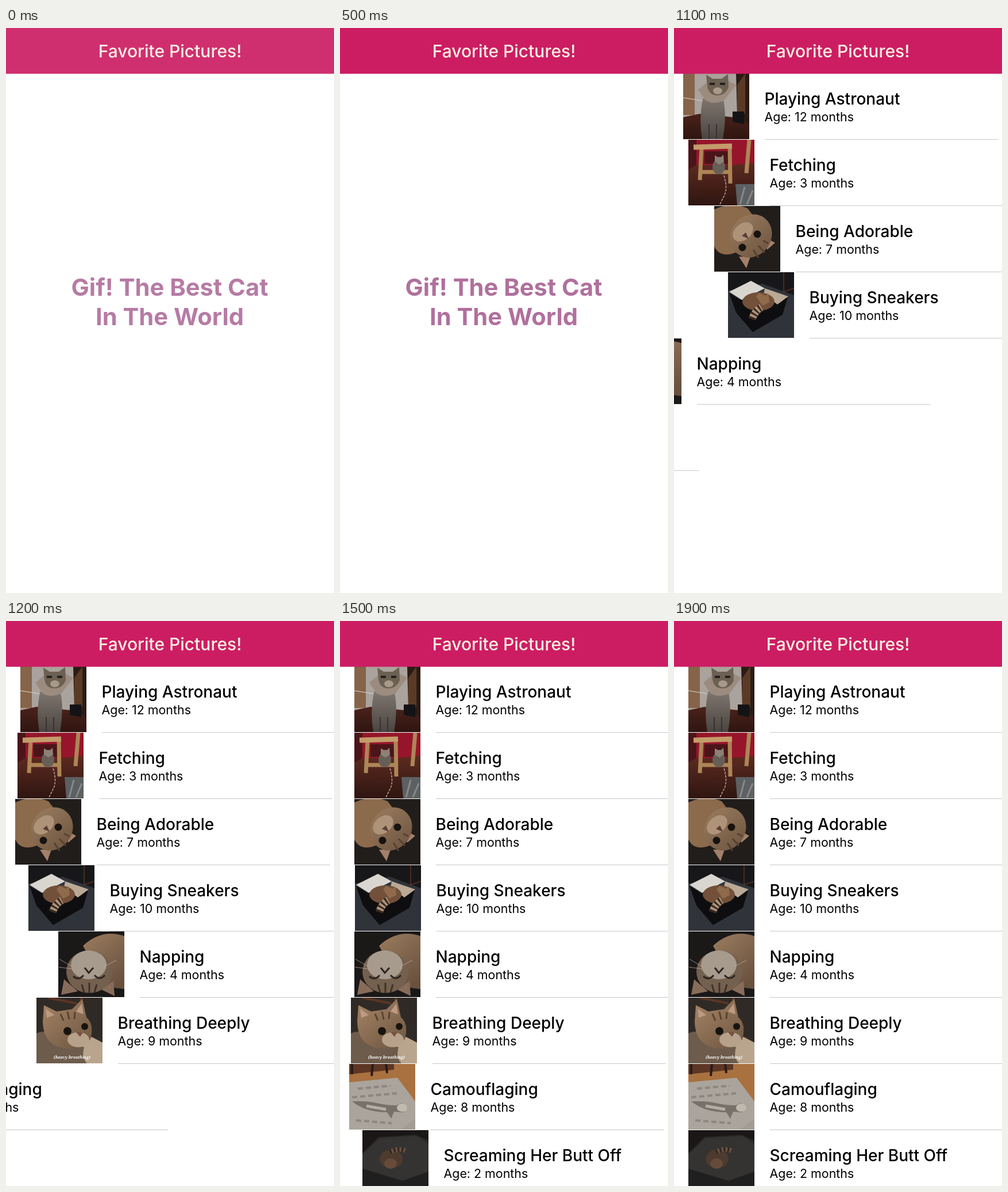
Recreate the animation shown at these times as an HTML page with a canvas. Size 571 by 981 pixels, loop 2 s.

```html
<!DOCTYPE html>
<html lang="en">
<head>
<meta charset="utf-8">
<title>Favorite Pictures!</title>
<style>
  html, body { margin: 0; width: 100%; height: 100%; overflow: hidden; background: #fff; }
  canvas { display: block; }
</style>
</head>
<body>
<canvas id="stage" width="571" height="981"></canvas>
<script>
const WIDTH = 571, HEIGHT = 981, LOOP = 2000, STEP = 100;
const LIST_TOP = 79, ROW_WIDTH = 573, ROW_HEIGHT = 115;
const FIRST_START = 769, STAGGER = 62.6;
const SWING = 0.01978;  // radians per ms
const DAMPING = 0.65;   // decay per radian of swing

const ctx = document.getElementById("stage").getContext("2d");

function shape(color, path) {
  ctx.fillStyle = color;
  ctx.fill(new Path2D(path));
}

function line(color, width, path, dash = []) {
  ctx.strokeStyle = color;
  ctx.lineWidth = width;
  ctx.setLineDash(dash);
  ctx.stroke(new Path2D(path));
}

function oval(color, x, y, rx, ry, degrees = 0) {
  ctx.fillStyle = color;
  ctx.beginPath();
  ctx.ellipse(x, y, rx, ry, degrees * Math.PI / 180, 0, 2 * Math.PI);
  ctx.fill();
}

function box(color, x, y, width, height) {
  ctx.fillStyle = color;
  ctx.fillRect(x, y, width, height);
}

function label(text, x, y, font, color, align = "left") {
  ctx.font = font;
  ctx.fillStyle = color;
  ctx.textAlign = align;
  ctx.fillText(text, x, y);
}

function gradient(x1, y1, x2, y2, from, to) {
  const g = ctx.createLinearGradient(x1, y1, x2, y2);
  g.addColorStop(0, from);
  g.addColorStop(1, to);
  return g;
}

const fur = gradient(20, 10, 95, 100, "#a08162", "#69513e");
const greyFur = gradient(0, 40, 0, 114, "#817870", "#4a4440");
const wood = gradient(0, 40, 0, 114, "#5c2b20", "#2f1511");
const backdrop = color => box(color, 0, 0, 115, 114);

function coneCat() {
  backdrop("#aaa29c");
  shape("#866449", "M0 0H20V72H0z");
  shape(wood, "M0 76L28 70 88 76 115 82V114H0z");
  shape("#2b1b15", "M92 0H115V90L94 72z");
  shape("#5b3a25", "M94 20L108 0V70L94 66z");
  shape("#141315", "M86 66H106V88L86 84z");
  line("#ddd6cf", 1, "M0 42L38 48");
  shape(greyFur, "M34 44Q52 36 70 46Q76 72 69 114H33Q27 80 34 44z");
  shape("#9c8c80", "M26 28L46 12 78 12 92 20 71 47Q51 55 38 46z");
  shape("#6c6053", "M40 2L51 9H67L78 1 79 24Q73 38 59 38T42 23z");
  line("#25211d", 4, "M46 18H55M64 18H73");
  oval("#a8998b", 60, 30, 8, 6);
  line("#38322f", 2, "M45 88V114M58 88V114");
}

function stoolCat() {
  backdrop(wood);
  shape("#96152a", "M0 0H115V40L75 44H0z");
  shape("#4a1519", "M0 0H14V44L0 52zM28 20H70V42H28z");
  shape("#5c6062", "M82 77H115V114H85z");
  line("#85898a", 3, "M90 112L98 82M102 112L112 88");
  line("#ad8557", 7, "M23 14L20 70M72 10L73 76M20 56H72M106 0L101 58");
  line("#c49c6b", 9, "M9 13L76 11");
  oval("#675f57", 53, 47, 11, 13);
  shape("#8c8175", "M46 27L51 30H57L61 26 62 38 54 43 46 38z");
  line("#c2a79b", 1.5, "M62 62Q69 85 62 98T55 113", [4, 2]);
}

function upsideDownCat() {
  backdrop("#211d1b");
  shape("#8c6a4c", "M0 6Q30-8 58 4L70 20 40 80Q10 92 0 70z");
  shape("#a3806a", "M43 88L56 108 63 88zM88 54L106 64 92 76z");
  oval(fur, 64, 52, 35, 39, 38);
  oval("#af9379", 50, 45, 20, 14, -40);
  oval("#17130f", 49, 72, 6.5, 6.5);
  oval("#17130f", 75, 49, 6.5, 6.5);
  shape("#5b3f34", "M48 52L60 57 55 46z");
  line("#56412f", 3, "M68 76L77 90M77 69L88 81M85 60L94 65");
}

function boxCat() {
  const tail = "M42 81Q47 67 58 61";
  backdrop("#30343a");
  shape("#17171a", "M0 0H115V40L60 20 0 32z");
  line("#5b3524", 1.5, "M97 0V34L115 28");
  shape("#0e0e11", "M2 36L22 48 104 43 95 74 43 104 14 70z");
  shape("#d9d6d0", "M2 34L40 15 64 28 24 48z");
  shape("#b9a995", "M64 28L105 42 86 56 62 38z");
  oval("#735039", 53, 51, 28, 16);
  shape("#8f6b4c", "M49 42L54 36 66 41 70 36 72 52 60 58z");
  line("#ab927b", 13, tail);
  line("#38271e", 13, tail, [3, 4]);
}

function nappingCat() {
  backdrop("#1b1818");
  shape(fur, "M43 25Q75-5 115 8V100L83 96z");
  shape("#886c5a", "M10 83L5 110 34 104zM75 101L98 112 96 86z");
  oval("#74604f", 54, 70, 40, 37);
  oval("#a79b8e", 53, 58, 31, 25);
  line("#30251f", 3, "M26 78Q36 86 44 76M63 76Q72 86 81 76M46 63L53 72 61 63");
  line("#403228", 3, "M41 92L45 106M54 89V107M67 92L63 106");
  line("#c1b6aa", 0.7, "M24 61L2 48M24 65L1 62M80 61L101 50");
}

function breathingCat() {
  backdrop("#302a26");
  line("#5b3524", 4, "M20 0L70 10M78 0V22");
  shape("#b9a58d", "M78 82L96 68 115 78V114H70z");
  shape("#6d5b4b", "M0 62Q16 54 28 68L83 86Q78 104 88 114H0z");
  shape(fur, "M11 42L13 13 35 24 62 20 80 2 87 34Q101 46 94 72Q76 94 44 87T11 42z");
  shape("#bd9a84", "M16 19L31 30 18 35zM79 10L69 24 82 29z");
  oval("#b7a18b", 73, 73, 19, 13);
  oval("#17140f", 54, 58, 7, 7);
  oval("#17140f", 84, 50, 6, 6);
  shape("#77503f", "M69 60H81L76 68z");
  line("#59432f", 3, "M42 28L47 40M54 24L57 38M67 25L66 37");
  label("(heavy breathing)", 62, 106, "italic bold 7px 'Noto Serif', serif", "#fff", "center");
}

function rugCat() {
  backdrop("#a39c93");
  shape("#a8713f", "M0 0H115V72L84 26 0 36z");
  shape("#5d3625", "M0 0H78V10L0 18z");
  line("#2b1b16", 4, "M41 0L39 21M64 0L66 16M5 0V18");
  shape("#aaa49c", "M0 32L84 24 115 65V95L90 114H0z");
  line("#8d867f", 4, "M15 43L72 38M5 58L83 51M12 98L74 103", [9, 5]);
  shape("#77716a", "M5 65Q31 64 48 68T82 72L91 68 101 75 94 84 78 83 73 95 66 84Q28 84 5 65z");
  oval("#c2b9ae", 92, 76, 9, 7);
  line("#b6aea4", 5, "M30 73L64 79");
}

function couchCat() {
  const tail = "M48 38Q63 30 76 36";
  backdrop("#292828");
  shape("#1b1717", "M0 0H115V18L92 8 28 12 0 40z");
  shape("#343332", "M0 42L30 14 94 10 115 24V72L70 88 0 67z");
  shape("#201f1f", "M0 67L70 88 115 72V114H0z");
  oval("#4e3b2f", 50, 50, 20, 16);
  line("#675142", 8, tail);
  line("#30241e", 8, tail, [3, 4]);
  oval("#664b3a", 49, 58, 11, 9);
}

const rows = [
  ["Playing Astronaut", 12, coneCat],
  ["Fetching", 3, stoolCat],
  ["Being Adorable", 7, upsideDownCat],
  ["Buying Sneakers", 10, boxCat],
  ["Napping", 4, nappingCat],
  ["Breathing Deeply", 9, breathingCat],
  ["Camouflaging", 8, rugCat],
  ["Screaming Her Butt Off", 2, couchCat]
];

const clamp01 = v => Math.min(1, Math.max(0, v));

// Underdamped spring from -1 to rest at 0.
function spring(ms) {
  const a = Math.max(0, ms) * SWING;
  return -Math.exp(-DAMPING * a) * (Math.cos(a) + DAMPING * Math.sin(a));
}

function drawRow([name, months, drawPhoto], x, y) {
  ctx.save();
  ctx.translate(x, y);
  box("#fff", 0, 0, ROW_WIDTH, ROW_HEIGHT);
  label(name, 166.5, 54, "500 28px Inter, sans-serif", "#000");
  label(`Age: ${months} months`, 166.5, 83, "21.4px Inter, sans-serif", "#000");
  box("#c8c7cc", 167, 114, ROW_WIDTH - 167, 1);
  ctx.translate(25, 0);
  ctx.beginPath();
  ctx.rect(0, 0, 115, 114);
  ctx.clip();
  drawPhoto();
  ctx.restore();
}

function draw(t) {
  box("#fff", 0, 0, WIDTH, HEIGHT);
  const headline = "bold 41.7px Inter, sans-serif";
  label("Gif! The Best Cat", 285, 465, headline, "#b0709d", "center");
  label("In The World", 285, 516, headline, "#b0709d", "center");

  // The slide falls slightly behind the clock as the last rows settle.
  const slideTime = t - 50 * clamp01((t - 1300) / 200);
  rows.forEach((row, i) => {
    const x = ROW_WIDTH * spring(slideTime - FIRST_START - i * STAGGER);
    drawRow(row, Math.round(x), LIST_TOP + i * ROW_HEIGHT);
  });

  box("#cc1d63", 0, 0, WIDTH, 79.5);
  label("Favorite Pictures!", 285.5, 50.5, "500 30px Inter, sans-serif", "#fbefe0", "center");
  box(`rgba(255, 255, 255, ${0.08 * (1 - clamp01(t / 400))})`, 0, 0, WIDTH, HEIGHT);
}

function tick() {
  const t = performance.now() % LOOP;
  draw(Math.floor(t / STEP) * STEP);
  requestAnimationFrame(tick);
}
tick();
</script>
</body>
</html>
```
